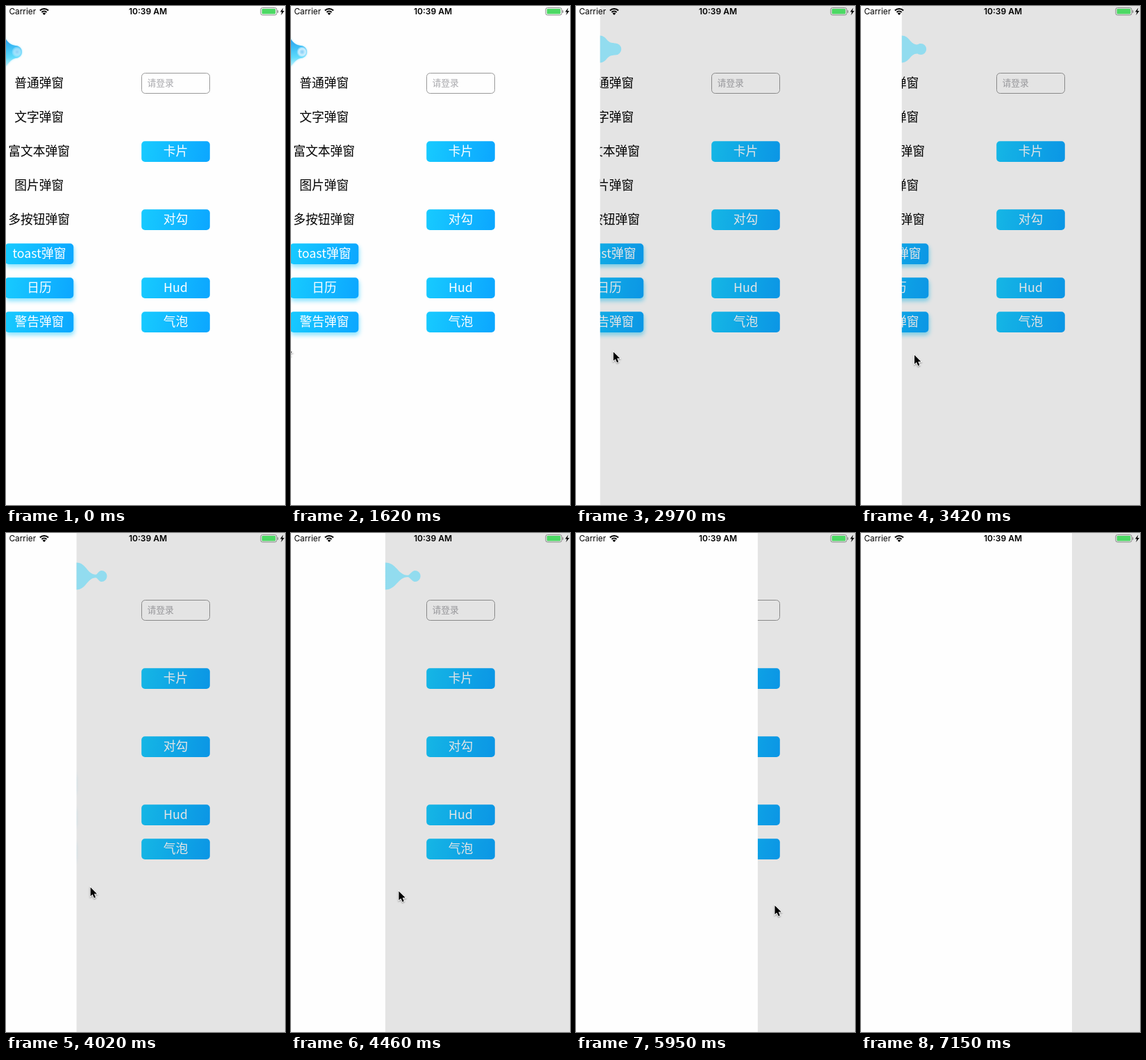
An HTML page with a canvas for the animation above (7.3 s loop, 402 by 717 pixels).

```html
<!DOCTYPE html>
<html lang="zh-CN">
<head>
<meta charset="utf-8">
<style>
html, body { margin: 0; width: 100%; height: 100%; overflow: hidden; background: #fefefe; }
canvas { display: block; }
</style>
</head>
<body>
<canvas id="stage" width="402" height="717"></canvas>
<script>
const W = 402, H = 717, LOOP = 7300, STEP = 149;
const DIM_AT = 2070, DROP_END = 5780;
const LEFT = 48, RIGHT = 244.5;
const CJK = '"Noto Sans CJK SC", "Noto Sans CJK", "Noto Sans", sans-serif';
const LATIN = 'Inter, Roboto, sans-serif';
const c = document.getElementById('stage').getContext('2d');

// [time, value] points joined by straight lines
const edgeKeys = [[2070, 0], [2370, 7], [2520, 10], [3420, 58.4], [3570, 67],
  [4460, 135], [4760, 161], [5950, 261], [6430, 304]];
const cursorX = [[0, -14], [600, -4], [1170, -11], [1620, -9], [2370, 22],
  [3420, 76], [4460, 154], [5950, 285], [7000, 386], [7150, 410]];
const cursorY = [[0, 489], [1620, 488], [2370, 490], [3420, 501],
  [4460, 514], [5950, 533], [7000, 705], [7150, 730]];

function at(keys, t) {
  if (t <= keys[0][0]) return keys[0][1];
  for (let i = 1; i < keys.length; i++) {
    const [t0, a] = keys[i - 1], [t1, b] = keys[i];
    if (t <= t1) return a + (b - a) * (t - t0) / (t1 - t0);
  }
  return keys[keys.length - 1][1];
}

function text(s, x, y, font, color, align = 'center') {
  c.font = font;
  c.fillStyle = color;
  c.textAlign = align;
  c.fillText(s, x, y);
}

function box(x, y, w, h, r) {
  c.beginPath();
  c.roundRect(x, y, w, h, r);
}

function gradient(x0, y0, x1, y1, ...stops) {
  const g = c.createLinearGradient(x0, y0, x1, y1);
  stops.forEach((color, i) => g.addColorStop(i / (stops.length - 1), color));
  return g;
}

const rowY = row => 111 + row * 49;

function label(s, cx, row, color = '#000', weight = 400) {
  text(s, cx, rowY(row) + 6.4, `${weight} 17.8px ${CJK}`, color);
}

function button(s, cx, row, shadow) {
  const x = cx - 49.3, y = rowY(row) - 14.7;
  c.save();
  if (shadow) {
    c.shadowColor = 'rgba(20,200,255,.5)';
    c.shadowBlur = 6;
    c.shadowOffsetX = 1;
    c.shadowOffsetY = 4;
  }
  c.fillStyle = gradient(x, y + 7, x + 98, y + 23, '#17caff', '#0ca7ff');
  box(x, y, 98.6, 29.6, 5);
  c.fill();
  c.restore();
  label(s, cx, row, '#fff', 300);
}

function page() {
  ['普通弹窗', '文字弹窗', '富文本弹窗', '图片弹窗', '多按钮弹窗']
    .forEach((s, i) => label(s, LEFT - .3, i));
  ['toast弹窗', '日历', '警告弹窗'].forEach((s, i) => button(s, LEFT, i + 5, true));
  [['卡片', 2], ['对勾', 4], ['Hud', 6], ['气泡', 7]]
    .forEach(([s, row]) => button(s, RIGHT, row));
  c.strokeStyle = '#999';
  c.lineWidth = 1;
  box(195.5, 96.5, 98, 29, 5);
  c.stroke();
  text('请登录', 203.5, 115.3, '12.8px ' + CJK, '#a9a9ad', 'left');
}

// Resting handle at the left edge, with a ring that lights up
function handle(t) {
  c.save();
  c.shadowColor = 'rgba(90,215,255,.5)';
  c.shadowBlur = 3;
  c.fillStyle = gradient(0, 46, 4, 88, '#2a9ff0', '#3dbef5', '#5ddafb', '#c9f6ff');
  c.beginPath();
  c.moveTo(-2, 44);
  c.bezierCurveTo(2, 53, 7, 56, 14, 57);
  c.bezierCurveTo(26, 58, 26, 74, 14, 75);
  c.bezierCurveTo(6, 77, 4, 83, -2, 88);
  c.fill();
  c.restore();
  const glow = Math.min(1, Math.max(0, (t - 150) / 1000));
  const halo = c.createRadialGradient(16, 66, 1, 16, 66, 8);
  halo.addColorStop(0, '#8fd2f8');
  halo.addColorStop(.55, `rgba(222,244,255,${.5 + .4 * glow})`);
  halo.addColorStop(1, 'rgba(160,225,255,.25)');
  c.fillStyle = halo;
  c.beginPath();
  c.arc(16, 66, 7.5, 0, 7);
  c.fill();
}

// Liquid drop stretched further as the panel opens
function drop(edge) {
  const cy = 62, half = 19.5;
  const tip = edge + 23.6 + .2 * edge;
  const r = 8 + 2 * Math.max(0, 1 - edge / 50);
  const neck = Math.max(1.3, 12.5 - .1 * edge);
  const nx = tip - r * Math.min(2.3, 1.2 + .008 * edge);
  const hx = tip - r, span = nx - edge;
  c.fillStyle = '#92dcef';
  c.beginPath();
  c.moveTo(edge, cy - half);
  c.bezierCurveTo(edge + span * .5, cy - half, nx - span * .45, cy - neck, nx, cy - neck);
  c.bezierCurveTo(nx + r * .3, cy - neck, hx - r * .5, cy - r, hx, cy - r);
  c.arc(hx, cy, r, -Math.PI / 2, Math.PI / 2);
  c.bezierCurveTo(hx - r * .5, cy + r, nx + r * .3, cy + neck, nx, cy + neck);
  c.bezierCurveTo(nx - span * .45, cy + neck, edge + span * .5, cy + half, edge, cy + half);
  c.fill();
}

function statusBar() {
  text('Carrier', 4.5, 12.3, '11.8px ' + LATIN, '#000', 'left');
  text('10:39 AM', 204.5, 12.3, '600 12px ' + LATIN, '#000');
  c.strokeStyle = c.fillStyle = '#000';
  c.lineWidth = 2;
  for (const r of [5, 8.6]) {
    c.beginPath();
    c.arc(55, 12.6, r, -Math.PI * .75, -Math.PI * .25);
    c.stroke();
  }
  c.beginPath();
  c.moveTo(55, 13);
  c.arc(55, 13, 3.3, -Math.PI * .75, -Math.PI * .25);
  c.fill();
  c.strokeStyle = '#888';
  c.lineWidth = 1;
  box(367, 2.5, 23, 10.5, 2.5);
  c.stroke();
  c.fillStyle = '#4cd964';
  box(368.7, 4, 19.6, 7.6, 1);
  c.fill();
  c.fillStyle = '#888';
  box(391, 6, 1.3, 4, 1);
  c.fill();
  c.fillStyle = '#000';
  c.fill(new Path2D('M399.5 2.5L395 8.6H397.6L396.2 13.2L401 7H398.2Z'));
}

const arrow = new Path2D('M0 0V14.4L3.3 11.4L5.8 17L8.2 16L5.8 10.5H10.4Z');

function cursor(x, y) {
  c.save();
  c.translate(x + .5, y + .5);
  c.scale(.9, .9);
  c.shadowColor = 'rgba(0,0,0,.4)';
  c.shadowBlur = 2;
  c.shadowOffsetY = 1;
  c.strokeStyle = '#fff';
  c.lineWidth = 2;
  c.stroke(arrow);
  c.shadowColor = 'transparent';
  c.fillStyle = '#000';
  c.fill(arrow);
  c.restore();
}

function draw(t) {
  const edge = at(edgeKeys, t);
  c.fillStyle = '#fefefe';
  c.fillRect(0, 0, W, H);
  page();
  if (t < DIM_AT) {
    handle(t);
  } else {
    c.fillStyle = 'rgba(0,0,0,.1)';
    c.fillRect(0, 0, W, H);
    c.fillStyle = '#fefefe';
    c.fillRect(0, 0, edge, H);
    if (t < DROP_END) drop(edge);
  }
  statusBar();
  cursor(at(cursorX, t), at(cursorY, t));
}

// The picture advances in even steps, like a screen recording
function tick(now) {
  const t = now % LOOP;
  draw(Math.floor((t + 25) / STEP) * STEP);
  requestAnimationFrame(tick);
}
requestAnimationFrame(tick);
</script>
</body>
</html>
```
